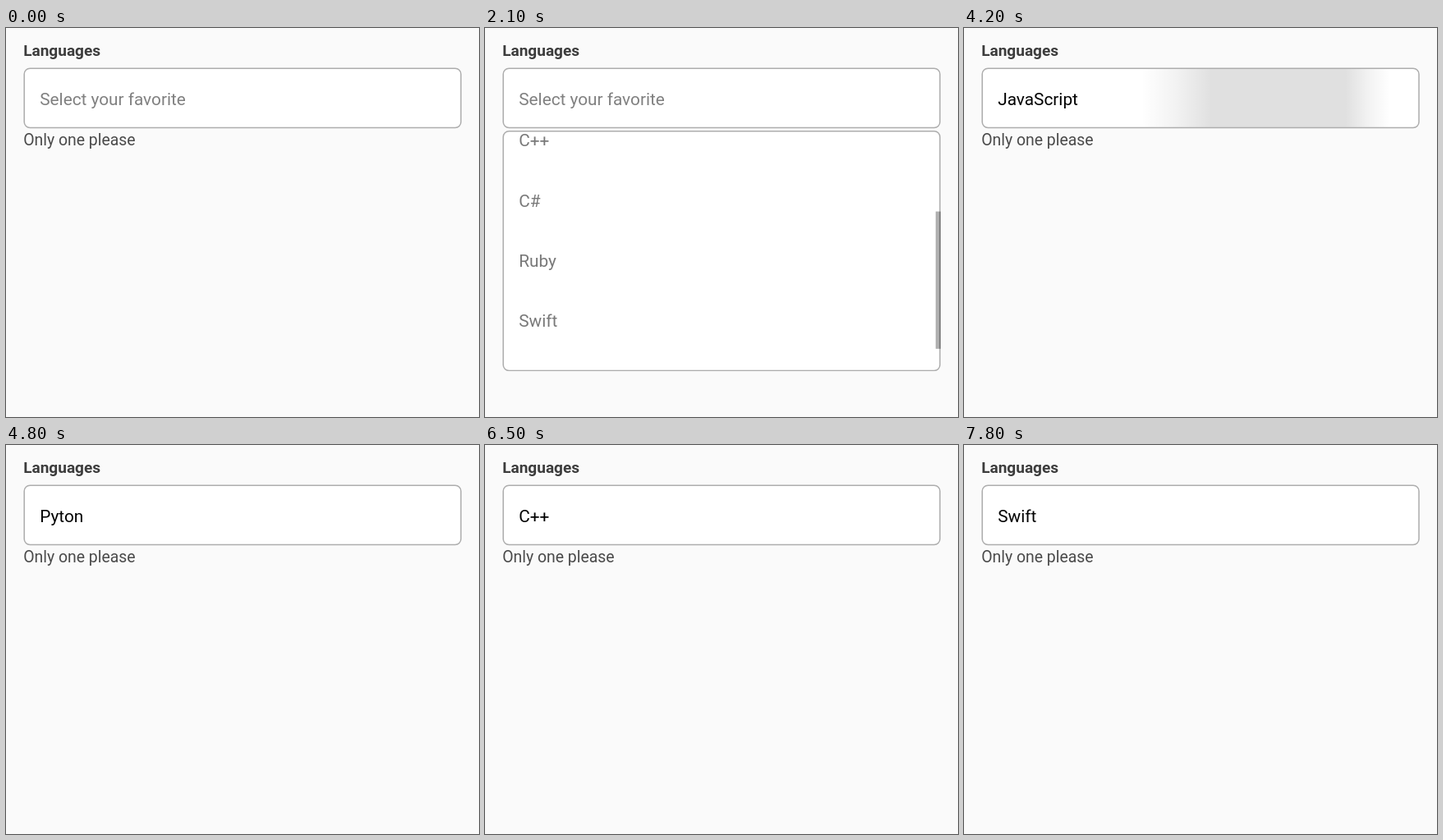
An HTML page with a canvas for the animation above (8000 ms loop, 576 px wide and 474 px high).

```html
<!DOCTYPE html>
<html lang="en">
<head>
<meta charset="utf-8">
<title>Language select</title>
<style>
  html, body { margin: 0; width: 100%; height: 100%; overflow: hidden; background: #fafafa; }
  canvas { display: block; width: 576px; height: 474px; }
</style>
</head>
<body>
<canvas id="stage" width="576" height="474"></canvas>
<script>
const ctx = document.getElementById('stage').getContext('2d');
const LOOP = 8000, TICK = 100;
const ROW = 73.3, TEXT_X = 41.2;
const FIELD = { x: 22.2, y: 49.2, w: 531.8, h: 72.3 };
const LIST = { x: 22.2, y: 125.7, w: 531.8, h: 291.8 };
const VIEW = 293;
const languages = ['JavaScript', 'Pyton', 'C++', 'C#', 'Ruby', 'Swift', 'Java'];
const CONTENT = ROW * languages.length;
const END = CONTENT - VIEW;

// [time, index of the chosen language]
const choices = [[0, -1], [3600, 0], [4700, 1], [5900, 2], [7600, 5]];
const openSpans = [[1100, 3600], [4300, 4700], [5500, 5900], [6900, 7600]];
// [start, end, from, to]; each holds its last value until the next
const scrolls = [
  [1600, 2100, 0, 172.6],
  [2200, 2700, 172.6, END],
  [2800, 3200, END, 0],
  [5400, 5401, 36.7, 36.7],
  [6800, 6801, 110, 110],
  [7000, 7400, 110, END]
];
// [press, start of fade, end of fade]
const presses = [[1000, 1600, 1800], [4200, 4300, 4500], [5400, 5800, 5900], [6800, 7000, 7200]];

const clamp = v => Math.max(0, Math.min(1, v));
const mix = (a, b, p) => a + (b - a) * p;
const smooth = p => p * p * (3 - 2 * p);
const latest = (rows, t) => rows.filter(r => r[0] <= t).pop();

function scrollAt(t) {
  const s = latest(scrolls, t);
  return s ? mix(s[2], s[3], smooth(clamp((t - s[0]) / (s[1] - s[0])))) : 0;
}

function stretchAt(t) {
  return t <= 3200 ? clamp((t - 3000) / 200) : clamp((3400 - t) / 200);
}

function text(str, x, y, size, color, weight = 400) {
  ctx.font = `${weight} ${size}px Roboto, sans-serif`;
  ctx.fillStyle = color;
  ctx.fillText(str, x, y);
}

function boxPath(b, scale = 1) {
  ctx.beginPath();
  ctx.roundRect(b.x, b.y, b.w, b.h * scale, 7);
}

function strokeBox(b, scale) {
  boxPath(b, scale);
  ctx.strokeStyle = '#adadad';
  ctx.lineWidth = 1.5;
  ctx.stroke();
}

function drawRipple(t) {
  const press = latest(presses, t);
  if (!press || t >= press[2]) return;
  const grow = clamp((t - press[0]) / 100);
  const fade = 1 - clamp((t - press[1]) / (press[2] - press[1]));
  const center = mix(383, 305, grow), core = mix(82, 148, grow);
  const left = center - core - mix(85, 150, grow);
  const right = center + core + mix(54, 190, grow);
  const g = ctx.createLinearGradient(left, 0, right, 0);
  const stop = (x, a) => g.addColorStop((x - left) / (right - left), `rgba(0,0,0,${a * fade})`);
  stop(left, 0);
  stop(mix(left, center - core, 0.5), 0.05);
  stop(center - core, 0.122);
  stop(center + core, 0.122);
  stop(mix(right, center + core, 0.5), 0.05);
  stop(right, 0);
  boxPath(FIELD);
  ctx.fillStyle = g;
  ctx.fill();
}

function drawField(t, chosen) {
  boxPath(FIELD);
  ctx.fillStyle = '#fff';
  ctx.fill();
  drawRipple(t);
  strokeBox(FIELD);
  if (chosen < 0) text('Select your favorite', TEXT_X, 93.6, 20.8, '#808080');
  else text(languages[chosen], TEXT_X, 93.6, 20.8, '#000');
}

function drawList(t, chosen) {
  const scroll = scrollAt(t), pull = stretchAt(t), scale = 1 + 0.021 * pull;
  ctx.save();
  ctx.beginPath();
  ctx.rect(0, 124, 576, 294.3);
  ctx.clip();

  boxPath(LIST, scale);
  ctx.fillStyle = '#fff';
  ctx.fill();

  ctx.save();
  ctx.clip();
  ctx.translate(0, LIST.y + 3.2 * pull);
  ctx.scale(1, scale);
  languages.forEach((name, i) => {
    const y = i * ROW - scroll;
    if (i === chosen) {
      ctx.fillStyle = '#d9ddff';
      ctx.fillRect(LIST.x, y, LIST.w, ROW);
    }
    text(name, TEXT_X, y + 44.6, 20.8, 'rgba(0,0,0,.53)');
  });
  ctx.restore();

  strokeBox(LIST, scale);
  ctx.fillStyle = 'rgba(0,0,0,.31)';
  ctx.fillRect(548.8, 125 + scroll * VIEW / CONTENT, 6.2, VIEW * VIEW / CONTENT * scale);
  ctx.restore();
}

function draw(time) {
  const t = Math.floor(time % LOOP / TICK) * TICK;
  const chosen = latest(choices, t)[1];
  ctx.fillStyle = '#fafafa';
  ctx.fillRect(0, 0, 576, 474);
  text('Languages', 21.2, 34.2, 19.05, '#3c3c3c', 700);
  drawField(t, chosen);
  if (openSpans.some(([a, b]) => t >= a && t < b)) drawList(t, chosen);
  else text('Only one please', 21.2, 142.6, 19.4, '#4a4a4a');
}

const start = performance.now();
function frame() {
  draw(performance.now() - start);
  requestAnimationFrame(frame);
}
frame();
</script>
</body>
</html>
```
